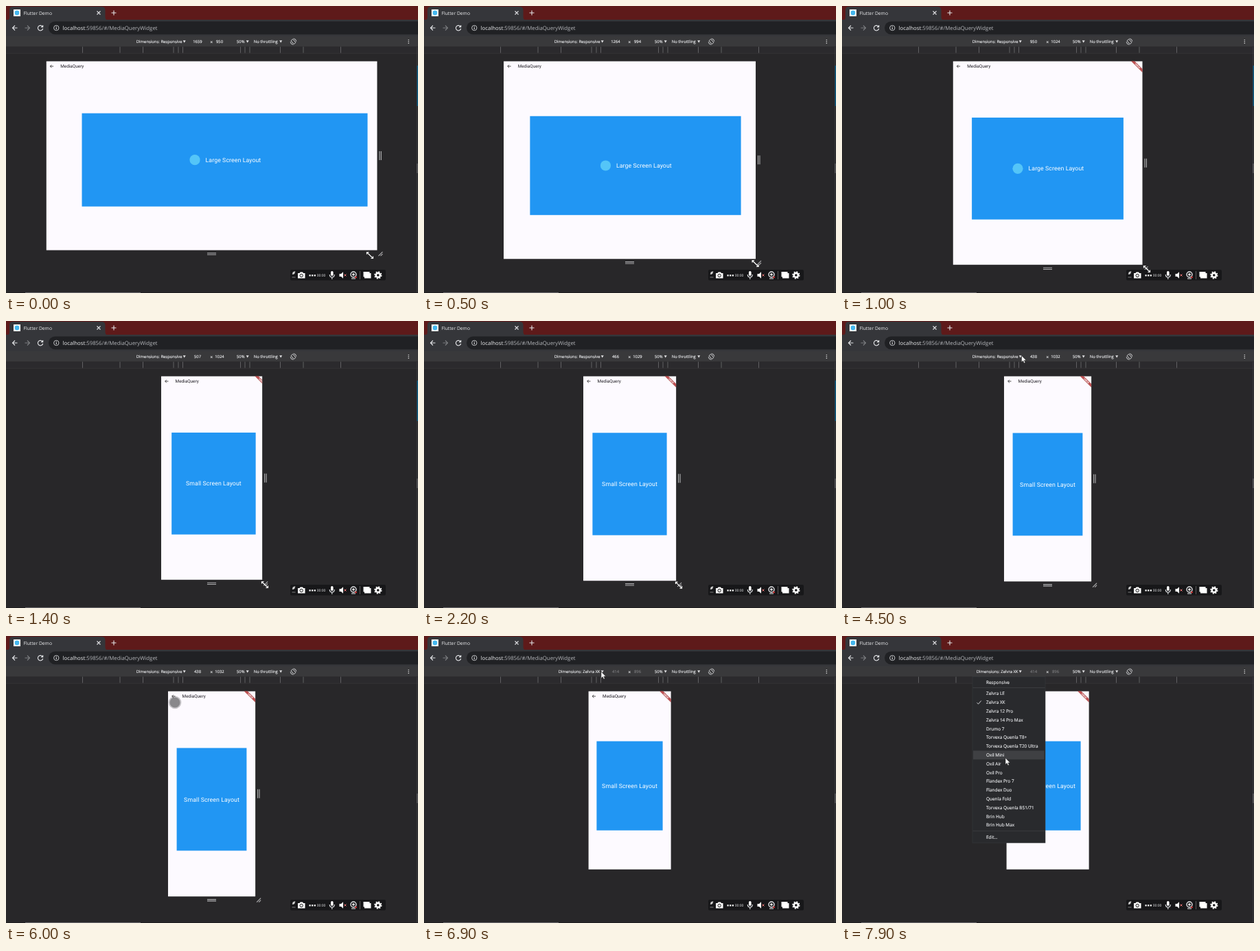
An HTML page that plays this animation: 600x419 px, repeating every 8 s.

```html
<!DOCTYPE html>
<html lang="en">
<head>
<meta charset="utf-8">
<title>Responsive preview</title>
<style>
html, body { margin: 0; width: 100%; height: 100%; overflow: hidden; background: #282729; }
body > svg { display: block; width: 100vw; height: 100vh; }
text { font-family: "Open Sans", "Noto Sans", sans-serif; fill: #eeeff1; text-rendering: geometricPrecision; white-space: pre; }
.bar, .menu { stroke: #eeeff1; stroke-width: .13; }
.bar { font-size: 5.9px; }
.menu { font-size: 6.45px; }
.page text { font-family: Roboto, sans-serif; }
.mid { text-anchor: middle; }
.line { fill: none; stroke: #e4e5e8; stroke-width: 1.1; }
.grip { stroke: #b0b0b2; stroke-width: 1.1; fill: none; }
</style>
</head>
<body>
<svg viewBox="0 0 600 419" preserveAspectRatio="none">
  <rect width="600" height="419" fill="#282729"/>

  <!-- Browser frame -->
  <rect width="600" height="21" fill="#5e1a1a"/>
  <path d="M2 20.5Q5 20 5 16V6Q5 1 10 1H139Q144.500 1 144.500 6V16Q144.500 20 148 20.500Z" fill="#35363a"/>
  <rect y="20" width="600" height="24" fill="#35363a"/>
  <rect x="62" y="22.500" width="560" height="19" rx="9.500" fill="#202124"/>
  <rect x="11" y="5" width="10" height="10" fill="#fff"/>
  <circle cx="16" cy="10" r="3.400" fill="#45b8f0"/>
  <text x="25.500" y="12.500" font-size="6.750">Flutter Demo</text>
  <path class="line" d="M132.500 7.500l5 5m0-5l-5 5M153.500 10h7m-3.500-3.500v7"/>
  <path class="line" d="M16.500 32h-7m3.500-3.500L9.500 32l3.500 3.500M53 29.800a3.700 3.700 0 1 0 .7 3.200M53.700 28v2.600h-2.600"/>
  <path class="line" d="M27.500 32h7M31 28.500l3.500 3.500-3.500 3.500" style="stroke:#7c7d80"/>
  <circle class="line" cx="73.300" cy="32" r="3.700" style="stroke-width:.8"/>
  <path class="line" d="M73.300 31.500v2.500m0-4.200v1"/>
  <text x="82.500" y="34.700" font-size="7.800">localhost<tspan fill="#b4b6ba">:59856/#/MediaQueryWidget</tspan></text>

  <!-- Device toolbar -->
  <rect y="44" width="600" height="15.500" fill="#39393b"/>
  <rect y="59.500" width="600" height="9.500" fill="#2b2a2d"/>
  <path d="M0 69.200H600" stroke="#3a393c" stroke-width=".7"/>
  <path id="ticks" stroke="#68676a" stroke-width=".9"/>
  <g class="bar">
    <text id="device" x="256.500" y="54.300" text-anchor="end"></text>
    <text id="width" class="mid" x="279" y="54.300"></text>
    <text class="mid" x="299.200" y="54.500" font-size="7">×</text>
    <text id="height" class="mid" x="311" y="54.300"></text>
    <text x="336" y="54.300">50%</text>
    <text x="360.700" y="54.300">No throttling</text>
  </g>
  <path d="M257.700 50.300h4l-2 3.400zM349.700 50.300h4l-2 3.400zM398.200 50.300h4l-2 3.400z" fill="#e0e0e2"/>
  <g class="line" style="stroke-width:.85">
    <rect x="416.700" y="48.700" width="3.600" height="6.600" rx=".7" transform="rotate(-40 418.500 52)"/>
    <path d="M418.500 47.600q4 .2 4.300 4.200M418.500 56.400q-4-.2-4.300-4.200"/>
  </g>
  <path d="M586.300 48.900v6" stroke="#ddd" stroke-width="1.300" stroke-dasharray="1.200 1.200"/>

  <!-- Window edges -->
  <path d="M598.700 60V419" stroke="#414043" stroke-width=".8"/>
  <path id="edge" d="M599.200 87v59" stroke="#0d587d" stroke-width="1.600"/>
  <path d="M598.900 230v14" stroke="#747376"/>
  <path d="M0 418.500H600" stroke="#1f1e20"/>
  <path d="M28 418.500H196" stroke="#69686b"/>

  <!-- Emulated page -->
  <g id="grips">
    <path id="track" fill="#3d3c3f"/>
    <path id="handles" class="grip"/>
  </g>
  <svg id="page" class="page">
    <rect width="600" height="419" fill="#fdfaff"/>
    <path d="M10.600 7.600H5.800M8 5.400L5.800 7.600 8 9.800" fill="none" stroke="#222" stroke-width=".8"/>
    <text x="20.700" y="9.900" font-size="6.400" style="fill:#1d1b20">MediaQuery</text>
    <rect id="panel" fill="#2196f3"/>
    <g id="label" font-size="8.720" letter-spacing=".1">
      <circle id="logo" cx="-43.500" r="7.600" fill="#54c5f8"/>
      <text id="caption" y="3.100" style="fill:#fff"></text>
    </g>
    <g id="banner">
      <rect x="-40" y="27" width="80" height="14" fill="#000" opacity=".18"/>
      <rect x="-40" y="28" width="80" height="12" fill="#b71c1c" opacity=".7"/>
      <text class="mid" y="37.600" font-size="10.200" font-weight="900" style="fill:#fff">DEBUG</text>
    </g>
  </svg>

  <!-- Recorder -->
  <rect x="414" y="385" width="139" height="15.500" rx="2" fill="#171719"/>
  <path d="M417 391.500l1-3 3-1-.8 3-2 1.200zM416.500 396h5" fill="#ddd" stroke="#aaa" stroke-width=".7"/>
  <path d="M425 390h2.500l1-1.500h3.500l1 1.500h2.500v7.500H425z" fill="#fff"/>
  <circle cx="430.200" cy="393.500" r="2.200" fill="#fff" stroke="#171719"/>
  <path d="M441.500 393.300h9.500" stroke="#fff" stroke-width="2.200" stroke-dasharray="2.200 1.400"/>
  <text x="452.700" y="395" font-size="5">00:00</text>
  <rect x="473" y="387" width="3.600" height="7" rx="1.800" fill="#fff"/>
  <path class="line" d="M471.300 392q0 4 3.500 4t3.500-4M474.800 396v3"/>
  <path d="M485.500 391h2.500l3-2.800v9.600l-3-2.800h-2.500z" fill="#fff"/>
  <path d="M492.500 391.500l3 3m0-3l-3 3" stroke="#e57373"/>
  <circle class="line" cx="506" cy="392" r="4" style="stroke-width:1.400"/>
  <circle cx="506" cy="392" r="1.800" fill="#fff"/>
  <path class="line" d="M503 398h6"/>
  <circle cx="509.500" cy="396" r="1.300" fill="#d33"/>
  <path d="M515.500 387v12" stroke="#777" stroke-width=".7"/>
  <path d="M520.500 388h9v2h2v7.500h-9.500v-2h-1.500z" fill="#fff"/>
  <circle cx="541.800" cy="393" r="3.100" fill="none" stroke="#fff" stroke-width="2.600"/>
  <circle cx="541.800" cy="393" r="4.900" fill="none" stroke="#fff" stroke-width="1.600" stroke-dasharray="1.920 1.920"/>

  <g id="menu">
    <rect x="190" y="59.500" width="106" height="242.500" fill="#292a2d" stroke="#38393c" stroke-width=".6"/>
    <rect id="hover" x="191" width="103.500" height="12.800" fill="#3f4043"/>
    <path d="M190.500 75.500h105M190.500 284.700h105" stroke="#434447" stroke-width=".7"/>
    <path id="check" class="line" d="M-3 .3l2 2L3.200-2.500" style="stroke-width:.9"/>
  </g>

  <g id="cursor">
    <path id="resize" d="M-4.500-4.500l9 9M-4.500-1.500v-3h3M4.500 1.500v3h-3" fill="none" stroke="#fff" stroke-width="1.200"/>
    <g id="touch">
      <circle r="9.300" fill="#000" opacity=".22"/>
      <circle r="7.500" fill="#000" opacity=".3"/>
    </g>
    <path id="arrow" d="M0 0V9.500L2.200 7.500 3.700 11 5.300 10.300 3.800 7H6.700Z" fill="#fff" stroke="#222" stroke-width=".5"/>
  </g>
</svg>
<script>
const $ = id => document.getElementById(id);
const set = (id, attrs) => { for (const k in attrs) $(id).setAttribute(k, attrs[k]); };
const show = (id, on) => { $(id).style.display = on ? '' : 'none'; };

const LOOP = 8000, STEP = 100;
const SCALE = 0.2905, CENTER = 299.5, TOP = 80.4, APP_BAR = 16.3;
const ROW = 12.8, FIRST_ROW = 84.2;
const PICKED = 6200;  // the phone preset takes effect

const devices = ['Zelvra LE', 'Zelvra XK', 'Zelvra 12 Pro', 'Zelvra 14 Pro Max', 'Drumo 7',
  'Torvexa Quenla T8+', 'Torvexa Quenla T20 Ultra', 'Oxil Mini', 'Oxil Air', 'Oxil Pro',
  'Flandex Pro 7', 'Flandex Duo', 'Quenla Fold', 'Torvexa Quenla B51/71', 'Brin Hub', 'Brin Hub Max'];

// Keys are [time, ...values]; values run linearly between them.
const widthKeys = [[0, 1659], [200, 1659], [700, 1000], [900, 1000], [1000, 950], [1100, 950],
  [1400, 507], [1900, 507], [2400, 438]];
const layoutKeys = [[0, 1790], [200, 1790], [700, 1010], [900, 1010], [1000, 950], [1100, 950],
  [1400, 527], [1600, 527], [1700, 507], [1900, 507], [2400, 438]];
const heightKeys = [[0, 950], [200, 950], [700, 1024], [1900, 1024], [2400, 1032]];
const cursorKeys = [[0, 530, 364], [200, 530, 364], [700, 451, 384], [900, 451, 384], [1000, 444, 384],
  [1100, 444, 384], [1400, 377, 385], [1900, 377, 385], [2400, 367, 386], [3000, 367, 386],
  [3100, 337, 123], [3400, 337, 123], [4100, 285, 84], [4300, 266, 55], [4400, 261.5, 50.5],
  [5000, 261.5, 50.5], [5200, 250, 85], [5300, 250, 85], [5400, 249, 88], [5500, 249, 88],
  [5700, 246, 97], [6100, 246, 97], [6800, 258, 52], [7000, 258, 52], [7500, 250, 112],
  [7600, 250, 112], [7900, 238, 178]];

function at(keys, t) {
  const i = keys.findIndex(k => k[0] > t);
  if (i < 0) return keys[keys.length - 1].slice(1);
  const a = keys[i - 1], b = keys[i], p = (t - a[0]) / (b[0] - a[0]);
  return a.slice(1).map((v, j) => v + (b[j + 1] - v) * p);
}

function menuText(label, y) {
  const el = document.createElementNS('http://www.w3.org/2000/svg', 'text');
  el.setAttribute('class', 'menu');
  el.setAttribute('x', 210);
  el.setAttribute('y', y + 2.2);
  el.textContent = label;
  $('menu').append(el);
}
menuText('Responsive', 67.8);
devices.forEach((name, i) => menuText(name, FIRST_ROW + i * ROW));
menuText('Edit…', 293.5);

set('ticks', { d: [42, 48.5, 55.5, 100, 133.5, 188]
  .map(x => `M${CENTER - x} 59.5v9M${CENTER + x} 59.5v9`).join('') });

function drawPage(t) {
  const preset = t >= PICKED;
  const width = preset ? 414 : at(widthKeys, t)[0];
  const height = preset ? 896 : at(heightKeys, t)[0];
  const layoutW = (preset ? 414 : at(layoutKeys, t)[0]) * SCALE;
  const layoutH = (t < 300 ? 937 : height) * SCALE;
  const w = width * SCALE, h = height * SCALE;
  const right = CENTER + w / 2, bottom = TOP + h;
  const cx = layoutW / 2, cy = (APP_BAR + layoutH) / 2;
  const large = layoutW / SCALE > 600;

  set('page', { x: CENTER - w / 2, y: TOP, width: w, height: h });
  set('panel', { x: layoutW * 0.1, y: cy - layoutH / 4, width: layoutW * 0.8, height: layoutH / 2 });
  set('label', { transform: `translate(${cx} ${cy})` });
  set('caption', { x: large ? -28 : 0, 'text-anchor': large ? 'start' : 'middle' });
  $('caption').textContent = `${large ? 'Large' : 'Small'} Screen Layout`;
  show('logo', large);
  set('banner', { transform: `translate(${layoutW} 0) scale(${SCALE}) rotate(45)` });

  show('grips', !preset);
  show('track', t >= 2700 && t < 3500);
  set('track', { d: `M${right} ${TOP}h10V${bottom + 10}H${CENTER - w / 2}v-10H${right}Z` });
  set('handles', { d: `M${right + 3.5} ${TOP + h / 2 - 6.5}v13m2.4 0v-13` +
    `M${CENTER - 6.5} ${bottom + 4.4}h13m0 2.3h-13` +
    `M${right + 2} ${bottom + 8.5}l6-6M${right + 5} ${bottom + 8.5}l3-3` });

  $('device').textContent = 'Dimensions: ' + (preset ? devices[1] : 'Responsive');
  $('width').textContent = Math.round(width);
  $('height').textContent = Math.round(height);
  for (const id of ['width', 'height']) $(id).style.cssText = preset ? 'fill:#8d8d90;stroke:none' : '';
}

function drawPointer(t) {
  const [x, y] = at(cursorKeys, t);
  const open = (t >= 4700 && t < 5900) || t >= 7100;
  const row = Math.floor((y - FIRST_ROW) / ROW + 0.5);
  const overTop = y > 60 && y < 75;

  show('menu', open);
  show('hover', row >= 0 || overTop);
  set('hover', { y: (overTop ? 67.8 : FIRST_ROW + row * ROW) - ROW / 2 });
  set('check', { transform: `translate(199.500 ${t >= PICKED ? FIRST_ROW + ROW : 67.8})` });

  const kind = t < 3100 ? 'resize' : !open && y > TOP ? 'touch' : 'arrow';
  for (const id of ['resize', 'touch', 'arrow']) show(id, id === kind);
  set('cursor', { transform: `translate(${x} ${y})` });
}

const start = performance.now();
function frame() {
  const elapsed = (performance.now() - start) % LOOP;
  const t = Math.floor(elapsed / STEP) * STEP;
  drawPage(t);
  drawPointer(t);
  show('edge', t < 4400);
  requestAnimationFrame(frame);
}
frame();
</script>
</body>
</html>
```
